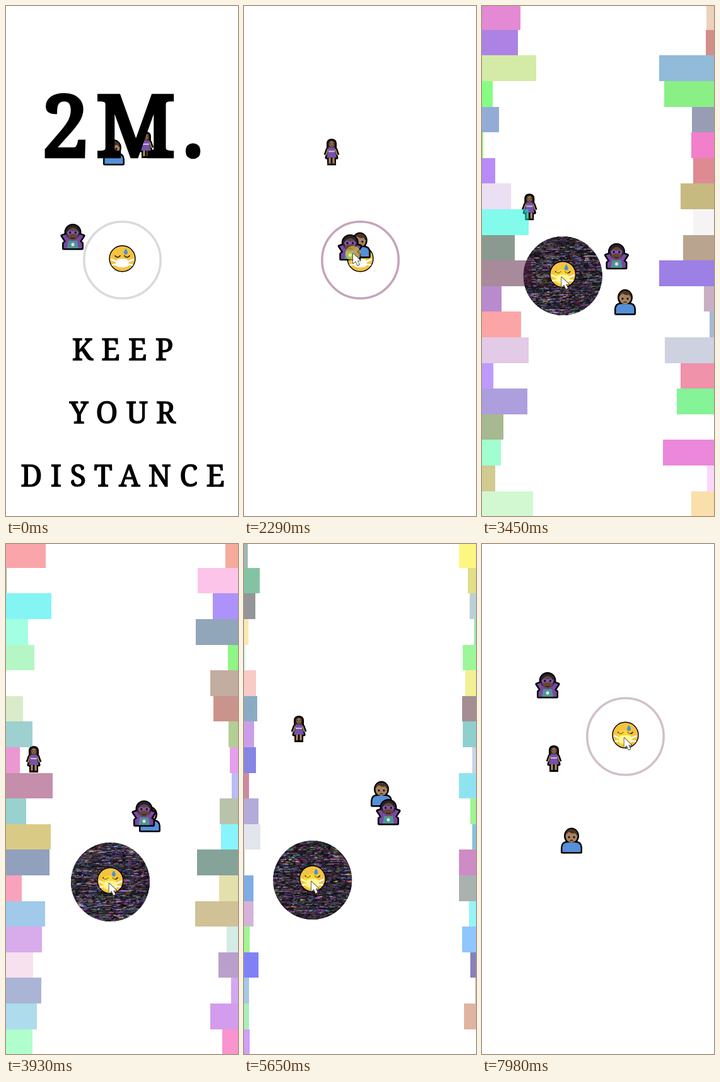
An HTML page with a canvas that plays this animation: 368 by 808 pixels, repeating every 8 s.

```html
<!DOCTYPE html>
<html lang="en">
<head>
<meta charset="utf-8">
<title>Keep your distance</title>
<style>
  html, body { margin: 0; width: 100%; height: 100%; overflow: hidden; background: #fff; }
  canvas { display: block; }
</style>
</head>
<body>
<canvas id="stage" width="368" height="808"></canvas>
<script>
const WIDTH = 368, HEIGHT = 808;
const LOOP = 8000, STEP = 67.8;
const TEXT_END = 1560, GRAB = 2540, ALARM_START = 2890, ALARM_END = 6650;
const ctx = document.getElementById('stage').getContext('2d');

// Everyone drifts straight between turns taken at shared times.
const turns = [0, 1350, 2980, 3930, 4830, 5650, 7980];
const drags = [GRAB, ...turns.slice(2)];
const man = [[171, 232], [126, 211], [226, 502], [228, 436], [225, 447], [218, 396], [142, 470]];
const woman = [[222, 220], [184, 143], [106, 296], [44, 341], [21, 326], [87, 293], [114, 340]];
const vampire = [[106, 366], [114, 404], [208, 367], [219, 427], [243, 552], [229, 425], [104, 224]];
const bubble = [[184.5, 402.5], [91.5, 321.5], [165.5, 535.5], [129.5, 567.5], [108.5, 532.5], [227.5, 305]];

const clamp = k => Math.max(0, Math.min(1, k));
const mix = (a, b, k) => a.map((v, i) => v + (b[i] - v) * k);

function at(points, times, t) {
  const next = times.findIndex(time => time > t);
  if (next === 0) return points[0];
  if (next < 0) return points[points.length - 1];
  const k = (t - times[next - 1]) / (times[next] - times[next - 1]);
  return mix(points[next - 1], points[next], k);
}

// The last drag swings out in an arc.
function bubbleAt(t) {
  const [x, y] = at(bubble, drags, t);
  const [from, to] = drags.slice(-2);
  const swing = Math.sin(Math.PI * clamp((t - from) / (to - from)));
  return [x + 100 * swing, y + 130 * swing];
}

function cursorAt(t, [x, y]) {
  if (t >= GRAB) return [x - 2, y + 2];
  const arrive = 1 - (1 - clamp((t - 420) / 930)) ** 2;
  return mix([262, 830], [173, 392], arrive);
}

function randomizer(seed) {
  let s = Math.imul(seed + 1, 2654435761) >>> 0;
  return () => {
    s = (s + 0x6D2B79F5) >>> 0;
    let r = Math.imul(s ^ (s >>> 15), s | 1);
    r ^= r + Math.imul(r ^ (r >>> 7), r | 61);
    return ((r ^ (r >>> 14)) >>> 0) / 4294967296;
  };
}

function shape(d, fill, stroke, width = 2.5) {
  const p = new Path2D(d);
  if (stroke) {
    ctx.strokeStyle = stroke;
    ctx.lineWidth = width;
    ctx.stroke(p);
  }
  if (fill) {
    ctx.fillStyle = fill;
    ctx.fill(p);
  }
}

function oval(x, y, rx, ry, fill, stroke, width) {
  shape(`M${x - rx} ${y}a${rx} ${ry} 0 1 0 ${2 * rx} 0a${rx} ${ry} 0 1 0 ${-2 * rx} 0z`, fill, stroke, width);
}

function placed([x, y], draw) {
  ctx.save();
  ctx.translate(x, y);
  ctx.lineJoin = 'round';
  draw();
  ctx.restore();
}

function drawMan() {
  const body = 'M-14.5 18V11Q-14 3 -6 3H6Q14 3 14.5 11V18z';
  shape(body, '#000', '#000', 5);
  oval(0, -7.5, 9.5, 10.5, '#000', '#000', 5);
  shape(body, '#5590d8');
  oval(0, -7.5, 9.5, 10.5, '#a8825e');
  shape('M-9.5 -8Q-10 -18 0 -18Q10 -18 9.5 -8Q7 -9 6 -12Q0 -10 -4 -14Q-7 -12 -9.5 -8z', '#4b3426');
  oval(-4, -5.5, 1.5, 1.8, '#111');
  oval(4, -5.5, 1.5, 1.8, '#111');
  shape('M-2.5 .5Q0 -2 2.5 .5', null, '#222', 1.2);
}

function drawWoman() {
  const hair = 'M-5.5 -6V-14Q-5 -18.5 0 -18.5Q5 -18.5 5.5 -14V-6z';
  const dress = 'M-5 -7H5L5.5 0L8 9H-8L-5.5 0z';
  const arms = 'M-5.5 -5L-9 5M5.5 -5L9 5';
  const legs = 'M-3 9V18M3 9V18';
  for (const part of [hair, dress]) shape(part, '#000', '#000', 5);
  shape(arms, null, '#000', 7);
  shape(legs, null, '#000', 8);
  shape('M-7 19.5H7', null, '#000', 3);
  shape(hair, '#3c281f');
  shape(arms, null, '#9d7650', 2.6);
  shape(legs, null, '#a98255', 3.4);
  shape(dress, '#7651ad');
  oval(0, -12.5, 3.8, 4.8, '#946b4b');
  shape('M-3 -13H-1M1 -13H3M-1.5 -10H1.5', null, '#281b16', 1);
  shape('M-5 -1H5', null, '#cfc0dc', 2);
}

function drawVampire() {
  const cape = 'M-14.5 18V10L-11 7L-17 -2L-11 -4H11L17 -2L11 7L14.5 10V18z';
  shape(cape, '#000', '#000', 5);
  oval(0, -7.5, 11, 11, '#000', '#000', 5);
  shape(cape, '#7947a5');
  shape('M-9 18L-7 6H7L9 18z', '#4d9490');
  oval(0, -7.5, 11.5, 11.5, '#25212a');
  oval(0, -5, 9, 10, '#654636');
  shape('M-9.5 -8Q-6 -12.5 0 -9Q6 -12.5 9.5 -8Q8 -1 2 -5H-2Q-8 -1 -9.5 -8z', '#8356b8');
  oval(-4.3, -7, 1.7, 2, '#181420');
  oval(4.3, -7, 1.7, 2, '#181420');
  shape('M-3.5 1Q0 3 3.5 1', null, '#271a19', 1.4);
  oval(0, 12, 2.5, 2.7, '#e5dbea');
}

function drawFace() {
  oval(0, 0, 19.8, 19.8, '#f4c342', '#000', 2.8);
  shape('M-18 1L-9 5M18 1L9 5M-17 10L-9 9M17 10L9 9', null, '#fff', 2.6);
  shape('M-8 1.5Q0 -1 8 1.5L10 4V11Q8 14 0 14Q-8 14 -10 11V4z', '#fff');
  shape('M-12 -5Q-7.5 1 -3 -5M3 -5Q7.5 1 12 -5', null, '#38260d', 1.8);
  shape('M5.5 -16Q9 -11 8.5 -9.5A3 3 0 0 1 2.5 -9.5Q2 -11 5.5 -16z', '#4d91d1');
}

function drawCursor() {
  oval(0, 0, 12, 12, 'rgba(255,238,50,.5)');
  shape('M0 0V16L4 12.5L7 19L10 17.5L7 11.5H12z', '#fff', '#222', 1.4);
}

function write(text, y, size, spacing, weight) {
  ctx.font = `${size}px "Noto Serif", serif`;
  ctx.letterSpacing = `${spacing}px`;
  ctx.lineWidth = weight;
  const x = (WIDTH + spacing) / 2 + 1;
  ctx.fillText(text, x, y);
  ctx.strokeText(text, x, y);
}

function drawText() {
  ctx.save();
  ctx.fillStyle = ctx.strokeStyle = '#000';
  ctx.textAlign = 'center';
  ctx.lineJoin = 'miter';
  ctx.miterLimit = 3;
  write('2M.', 238, 133, 12, 6.5);
  ['KEEP', 'YOUR', 'DISTANCE'].forEach((word, i) => write(word, 561 + 100 * i, 47, 13.5, 1.4));
  ctx.restore();
}

function drawStatic(rand) {
  const radius = 62.5, edge = Math.ceil(radius);
  ctx.save();
  ctx.beginPath();
  ctx.arc(0, 0, radius, 0, 7);
  ctx.clip();
  for (let y = -edge; y < edge; y++) {
    const glow = 60 + 170 * rand();
    for (let x = -edge; x < edge;) {
      const length = 1 + Math.floor(rand() ** 2 * 8);
      const light = 18 + glow * rand() ** 2;
      const channel = k => Math.floor(light * k * (0.4 + rand()));
      ctx.fillStyle = `rgb(${channel(1)},${channel(0.85)},${channel(1.1)})`;
      ctx.fillRect(x, y, length + 1, 2);
      x += length;
    }
  }
  ctx.restore();
}

function drawBars(rand, reach) {
  const rows = 20, pitch = 40.6;
  const top = row => Math.round(row * pitch - 2.9);
  for (let row = 0; row < rows; row++) {
    for (const right of [false, true]) {
      const channel = () => Math.floor(rand() * 256);
      const width = Math.round(rand() * reach);
      ctx.fillStyle = `rgba(${channel()},${channel()},${channel()},.5)`;
      ctx.fillRect(right ? WIDTH - width : 0, top(row), width, top(row + 1) - top(row));
    }
  }
}

function ringColor(t) {
  if (t < 1150) return '#dadada';
  return t < ALARM_START ? '#c6a4bb' : '#d2bfcc';
}

function render(t) {
  const alarm = t >= ALARM_START && t < ALARM_END;
  const rand = randomizer(Math.floor(t / STEP));
  const centre = bubbleAt(t);

  ctx.fillStyle = '#fff';
  ctx.fillRect(0, 0, WIDTH, HEIGHT);
  placed(centre, () => alarm ? drawStatic(rand) : oval(0, 0, 60.7, 60.7, null, ringColor(t), 3.6));
  placed([centre[0], centre[1] - 2.3], drawFace);
  placed(at(man, turns, t), drawMan);
  placed(at(woman, turns, t), drawWoman);
  placed(at(vampire, turns, t), drawVampire);
  if (t < TEXT_END) drawText();
  if (alarm) drawBars(rand, Math.min(100, (ALARM_END - t) * 0.0274));
  placed(cursorAt(t, centre), drawCursor);
}

const start = performance.now();
function tick() {
  render((performance.now() - start) % LOOP);
  requestAnimationFrame(tick);
}
tick();
</script>
</body>
</html>
```
